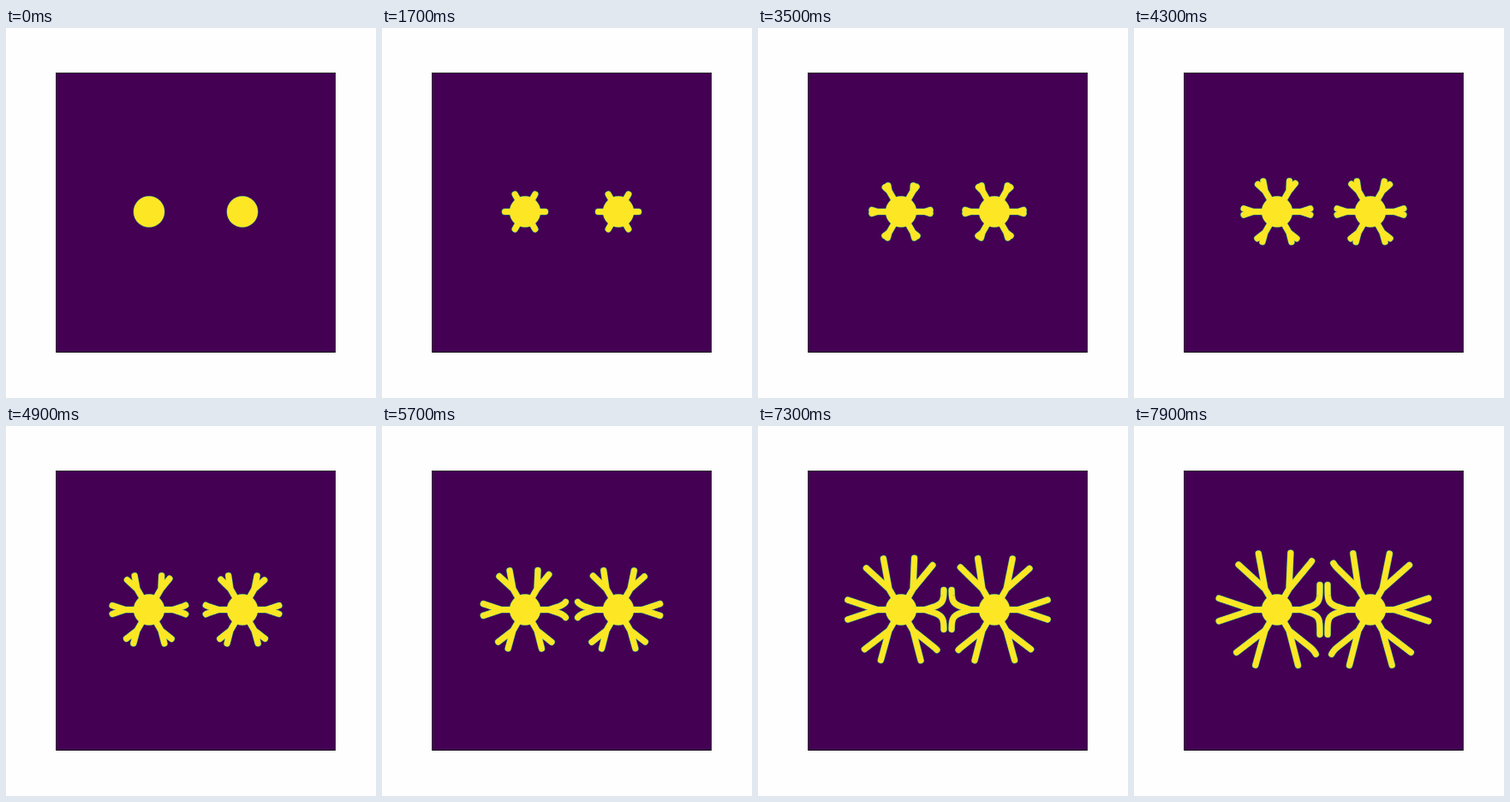
An HTML page with a canvas that plays this animation: 432 by 432 pixels, repeating every 8000 ms.

```html
<!DOCTYPE html>
<html lang="en">
<head>
<meta charset="utf-8">
<title>Growing cells</title>
<style>
  html, body { margin: 0; width: 100%; height: 100%; overflow: hidden; background: #fefefe; }
  canvas { display: block; width: 432px; height: 432px; }
</style>
</head>
<body>
<canvas id="stage" width="432" height="432"></canvas>
<script>
const ctx = document.getElementById('stage').getContext('2d');
const LOOP = 8000, HOLD = 500, STEP = 200;
const PURPLE = '#440154', TEAL = '#21918c', YELLOW = '#fde725';
const CENTER_Y = 214.5, SOMA = 18, ARM_WIDTH = 7;

// Arms sprout every 60 degrees, then fork into two straight branches.
const STEM_START = 14.5, STEM_SPEED = 1.5, FORK_STEP = 9, SPREAD = 18.5;
const FORK_DIST = STEM_START + STEM_SPEED * FORK_STEP;

// Branches turn aside as they come near the neighbouring cell.
const REACH = 50, TURN_ZONE = 12;

// facing: direction of the neighbour; tilts: lean of each fork in degrees.
const cells = [
  { x: 167, facing: 1, tilts: [0, -3, 4, 0, 1, -9] },
  { x: 276, facing: -1, tilts: [0, -4, 3, 0, 3, 0] },
];

const polar = (degrees, dist) => {
  const a = degrees * Math.PI / 180;
  return [dist * Math.cos(a), dist * Math.sin(a)];
};

const branchLength = step => {
  const age = Math.max(0, step - FORK_STEP);
  return 0.94 * age + 0.02 * age * age;
};

function traceBranch(arm, heading, facing, step) {
  let [x, y] = polar(arm, STEM_START + STEM_SPEED * Math.min(step, FORK_STEP));
  const [dx, dy] = polar(heading, 1);
  ctx.moveTo(0, 0);
  ctx.lineTo(x, y);
  for (let left = branchLength(step); left > 0; left--) {
    const room = Math.min(1, Math.max(0, (REACH - x * facing) / TURN_ZONE));
    const vx = dx * facing > 0 ? dx * room : dx;
    const scale = Math.min(1, left) / Math.hypot(vx, dy);
    x += vx * scale;
    y += dy * scale;
    ctx.lineTo(x, y);
  }
}

function drawCell({ x, facing, tilts }, step, color, grow) {
  ctx.save();
  ctx.translate(x, CENTER_Y);
  ctx.fillStyle = ctx.strokeStyle = color;
  ctx.lineWidth = ARM_WIDTH + grow * 2;
  ctx.lineCap = ctx.lineJoin = 'round';
  ctx.beginPath();
  ctx.arc(0, 0, SOMA + grow, 0, Math.PI * 2);
  ctx.fill();
  if (step >= 0) {
    ctx.beginPath();
    tilts.forEach((tilt, i) => {
      const arm = i * 60;
      for (const side of [-1, 1]) {
        traceBranch(arm, arm + tilt + side * SPREAD, facing, step);
      }
    });
    ctx.stroke();
  }
  ctx.restore();
}

function draw(now) {
  const step = Math.floor((now % LOOP - HOLD) / STEP);
  ctx.clearRect(0, 0, 432, 432);
  ctx.fillStyle = PURPLE;
  ctx.fillRect(59, 53, 325, 326);
  ctx.lineWidth = 1;
  ctx.lineJoin = 'miter';
  ctx.strokeStyle = 'rgba(0, 0, 0, 0.8)';
  ctx.strokeRect(58.5, 52.5, 326, 326);
  for (const [color, grow] of [[TEAL, 0.5], [YELLOW, 0]]) {
    cells.forEach(cell => drawCell(cell, step, color, grow));
  }
}

const start = performance.now();
function tick() {
  draw(performance.now() - start);
  requestAnimationFrame(tick);
}
tick();
</script>
</body>
</html>
```
